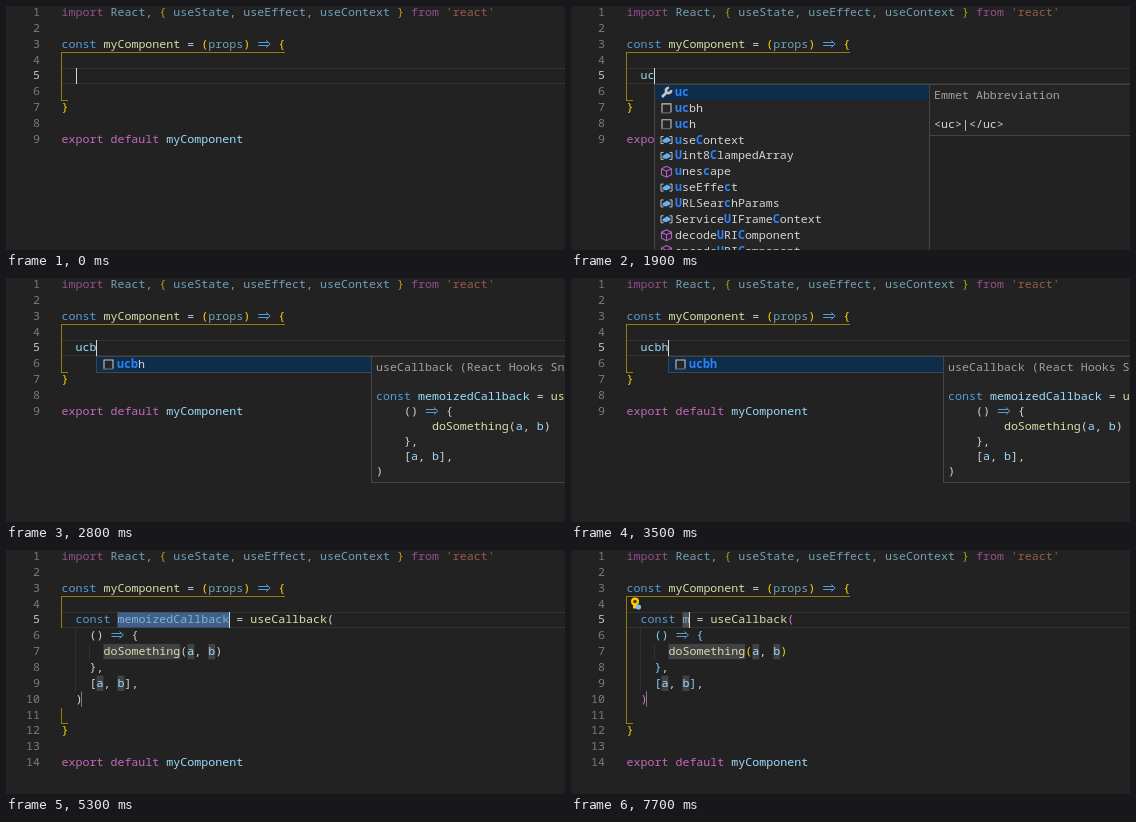
These frames come from a looping animation (559x244 px, 8000 ms). An HTML page with a canvas:

```html
<!DOCTYPE html>
<html lang="en">
<head>
<meta charset="utf-8">
<title>Snippet completion</title>
<style>
  html, body { margin: 0; height: 100%; overflow: hidden; background: #222; }
  canvas { display: block; }
</style>
</head>
<body>
<canvas id="stage" width="559" height="244"></canvas>
<script>
const ctx = document.getElementById('stage').getContext('2d');
const LOOP = 8000, CHAR = 6.988, LINE = 15.85, LEFT = 55.53;
const FONT = '11.65px "Noto Sans Mono", "DejaVu Sans Mono", monospace';

// Colour keys; an upper-case key paints the same colour dimmed (unused code).
const COLORS = {
  k: '#569cd6', f: '#dcdcaa', v: '#9cdcfe', p: '#d4d4d4', m: '#c768bd', s: '#ce7b5c',
  g: '#a0a0a0', h: '#2f81f7', y: '#ffd700', o: '#da70d6', b: '#87cefa'
};

const HEAD = [
  "M:import ~V:React~P:, ~Y:{ ~V:useState~P:, ~V:useEffect~P:, ~V:useContext ~Y:} ~M:from ~S:'react'",
  '',
  'k:const ~f:myComponent ~p:= ~y:(~V:props~y:) ~k:=>~y: {',
  ''
];
const TAIL = ['y:}', '', 'm:export default ~v:myComponent'];
const snippetLines = name => [
  `p:  ~k:const ~${name} ~p:= ~f:useCallback~o:(`,
  'p:    ~b:() ~k:=>~b: {',
  'p:      ~f:doSomething~y:(~v:a~p:, ~v:b~y:)',
  'p:    ~b:}~p:,',
  'p:    ~b:[~v:a~p:, ~v:b~b:]~p:,',
  'p:  ~o:)'
];

// Each entry: icon key, then the label with its matched parts between asterisks.
const LIST_U = ['w *u*', 'v *u*ndefined', 'c *u*nescape', 'v *u*seContext', 'v *u*seEffect',
  'v *u*seState', 's *u*cbh', 's *u*ch', 's *u*eh', 'w *u*l', 's *u*mb'];
const LIST_UC = ['s *uc*bh', 's *uc*h', 'v *u*se*C*ontext', 'v *U*int8*C*lampedArray',
  'c *u*nes*c*ape', 'v *u*seEffe*c*t', 'v *U*RLSear*c*hParams', 'v Service*U*IFrame*C*ontext',
  'c decode*U*RI*C*omponent', 'c encode*U*RI*C*omponent', 'v SpeechSynthesis*U*tteran*c*e'];

const emmet = tag => ({ height: 52, title: 'Emmet Abbreviation', body: [`p:<${tag}>|</${tag}>`] });
const LOADING = { height: 127, title: 'Loading...', body: [] };
const CALLBACK = {
  height: 127,
  title: 'useCallback (React Hooks Snippets)',
  body: ['k:const ~v:memoizedCallback ~p:= ~f:useCallback~p:(', 'p:    () ~k:=>~p: {',
    'p:        ~f:doSomething~p:(~v:a~p:, ~v:b~p:)', 'p:    },', 'p:    [~v:a~p:, ~v:b~p:],', 'p:)']
};

const TYPED = [[0, ''], [1300, 'u'], [1700, 'uc'], [2500, 'ucb'], [3300, 'ucbh']];
const POPUPS = [
  [0, null],
  [1400, { x: 76, list: LIST_U, detail: emmet('u') }],
  [1800, { x: 83, list: ['w *uc*', ...LIST_UC], detail: emmet('uc') }],
  [2100, { x: 83, list: LIST_UC, detail: CALLBACK }],
  [2600, { x: 90, list: LIST_UC, detail: LOADING }],
  [2800, { x: 90, list: ['s *ucb*h'], detail: CALLBACK }],
  [3300, { x: 97, list: ['s *ucbh*'], detail: LOADING }],
  [3500, { x: 97, list: ['s *ucbh*'], detail: CALLBACK }],
  [5300, null]
];
const CURSOR = [[0, true], [500, false], [1300, true], [3100, false], [3300, true], [3800, false],
  [4300, true], [4800, false], [5300, true], [5700, false], [6200, true], [6700, false], [7200, true]];

const at = (track, t) => track.filter(([start]) => start <= t).pop()[1];
const lineTop = n => -1.2 + LINE * (n - 1);
const colX = col => LEFT + CHAR * col;

function rect(x, y, w, h, color) {
  ctx.fillStyle = color;
  ctx.fillRect(x, y, w, h);
}

function stroke(color, width, ...paths) {
  ctx.strokeStyle = color;
  ctx.lineWidth = width;
  ctx.beginPath();
  for (const points of paths) points.forEach(([x, y], i) => i ? ctx.lineTo(x, y) : ctx.moveTo(x, y));
  ctx.stroke();
}

function disc(x, y, r, color) {
  ctx.fillStyle = color;
  ctx.beginPath();
  ctx.arc(x, y, r, 0, 2 * Math.PI);
  ctx.fill();
}

function text(str, x, y, color, bold) {
  ctx.font = (bold ? 'bold ' : '') + FONT;
  ctx.fillStyle = color;
  ctx.fillText(str, x, y);
}

function arrow(x, y, color) {
  stroke(color, 1, [[x + 1, y - 5.5], [x + 11, y - 5.5]], [[x + 1, y - 2.5], [x + 11, y - 2.5]],
    [[x + 9, y - 7.5], [x + 13, y - 4], [x + 9, y - 0.5]]);
}

function code(line, x, y) {
  if (!line) return;
  for (const token of line.split('~')) {
    const key = token[0], str = token.slice(2), color = COLORS[key.toLowerCase()];
    ctx.globalAlpha = /[A-Z]/.test(key) ? 0.67 : 1;
    if (str === '=>') arrow(x, Math.round(y), color);
    else text(str, x, y, color);
    x += str.length * CHAR;
  }
  ctx.globalAlpha = 1;
}

const ICONS = {
  w() {
    stroke('#c5c5c5', 2.6, [[-4.5, 4.5], [1, -1]]);
    ctx.beginPath();
    ctx.arc(2, -2, 2.6, -0.2, 4.9);
    ctx.stroke();
  },
  v() {
    stroke('#c5c5c5', 1, [[-3, -3.5], [-5.5, -3.5], [-5.5, 3.5], [-3, 3.5]],
      [[3, -3.5], [5.5, -3.5], [5.5, 3.5], [3, 3.5]]);
    ctx.fillStyle = '#62b0f5';
    ctx.beginPath();
    for (const [x, y] of [[-4, 0], [0.5, -3], [4, -1], [4, 1], [-0.5, 3], [-4, 2]]) ctx.lineTo(x, y);
    ctx.fill();
  },
  c() {
    stroke('#ae62c4', 1.1, [[0, -5.5], [5, -3], [5, 3], [0, 5.5], [-5, 3], [-5, -3], [0, -5.5]],
      [[-5, -3], [0, -0.5], [5, -3]], [[0, -0.5], [0, 5.5]]);
  },
  s() {
    rect(-4.5, -4.5, 9, 9, '#252526');
    stroke('#c5c5c5', 1.1, [[-4.5, 4], [-4.5, -4.5], [4.5, -4.5], [4.5, 4]]);
    for (let x = -5; x < 5; x += 2) rect(x, 4, 1, 1, '#c5c5c5');
  }
};

function icon(kind, x, y) {
  ctx.save();
  ctx.translate(x, y);
  ICONS[kind]();
  ctx.restore();
}

function panel(x, y, w, h) {
  rect(x, y, w, h, '#454545');
  rect(x + 1, y + 1, w - 2, h - 2, '#252526');
}

function drawPopup({ x, list, detail }) {
  const y = 78, width = 276;
  panel(x, y, width, Math.round(list.length * LINE) + 1);
  rect(x + 1, y + 1, width - 2, 15, '#0e2d4b');
  list.forEach((item, i) => {
    const top = y + i * LINE;
    icon(item[0], x + 12.5, top + 8.5);
    let textX = x + 21;
    item.slice(2).split('*').forEach((part, j) => {
      const matched = j % 2 === 1;
      text(part, textX, top + 12, matched ? COLORS.h : COLORS.p, matched);
      textX += part.length * CHAR;
    });
  });

  const left = x + width - 1;
  panel(left, y, 559 - left + 1, detail.height);
  code('g:' + detail.title, left + 5, y + 15);
  detail.body.forEach((line, i) => code(line, left + 5, y + 44 + 15 * i));
}

function drawGuide(inserted, settled) {
  const bottom = inserted ? 173.5 : 94.5;
  const sides = inserted && !settled
    ? [[[55.5, 46.5], [55.5, 78]], [[55.5, 158], [55.5, bottom]]]
    : [[[55.5, 46.5], [55.5, bottom]]];
  stroke('#947d0a', 1, [[55, 46.5], [279, 46.5]], [[55, bottom], [62, bottom]], ...sides);
}

function drawPlaceholders(renamed) {
  const mark = (line, col, length, color = '#404244') =>
    rect(colX(col), lineTop(line), CHAR * length, LINE - 0.5, color);
  if (renamed) mark(5, 8, 1, '#4b5057');
  else mark(5, 8, 16, '#415f88');
  mark(7, 6, 11);
  for (const [line, col] of [[7, 18], [7, 21], [9, 5], [9, 8]]) mark(line, col, 1);
  rect(75, lineTop(10), 1, LINE - 0.5, '#7c7c7c');
}

function drawBulb() {
  disc(64, 51.5, 4, '#ffcc00');
  disc(64, 51.5, 1.8, '#4a3d10');
  rect(62, 54.5, 4, 4, '#ffcc00');
  disc(67.5, 57, 2.6, '#75beff');
}

function draw(t) {
  const inserted = t >= 5300, settled = t >= 5700, renamed = t >= 7700;
  const typed = at(TYPED, t);
  let middle = ['v:  ' + typed];
  if (inserted) {
    middle = snippetLines(renamed ? 'V:m' : 'V:memoizedCallback');
    // Bracket colours arrive a moment after the snippet is inserted.
    if (!settled) middle = middle.map(line => line.replace(/~[yob]:/g, '~p:'));
  }
  const lines = [...HEAD, ...middle, '', ...TAIL];

  rect(0, 0, 559, 244, '#222222');
  rect(55, 62, 504, 1, '#323232');
  rect(55, 77, 504, 1, '#323232');
  if (inserted) {
    rect(69, lineTop(6), 1, LINE * 4, '#303030');
    rect(83, lineTop(7), 1, LINE, '#303030');
    drawPlaceholders(renamed);
  }
  drawGuide(inserted, settled);

  lines.forEach((line, i) => {
    const y = lineTop(i + 1) + 11.2, label = String(i + 1);
    text(label, 34 - label.length * CHAR, y, i === 4 ? '#c6c6c6' : '#7b7b7b');
    code(line, LEFT, y);
  });

  if (settled) drawBulb();
  const popup = at(POPUPS, t);
  if (popup) drawPopup(popup);
  if (at(CURSOR, t)) {
    const col = inserted ? (renamed ? 9 : 24) : 2 + typed.length;
    rect(Math.round(colX(col)), 62, 1, 16, '#d8d8d8');
  }
}

function frame() {
  draw(performance.now() % LOOP);
  requestAnimationFrame(frame);
}
frame();
</script>
</body>
</html>
```
